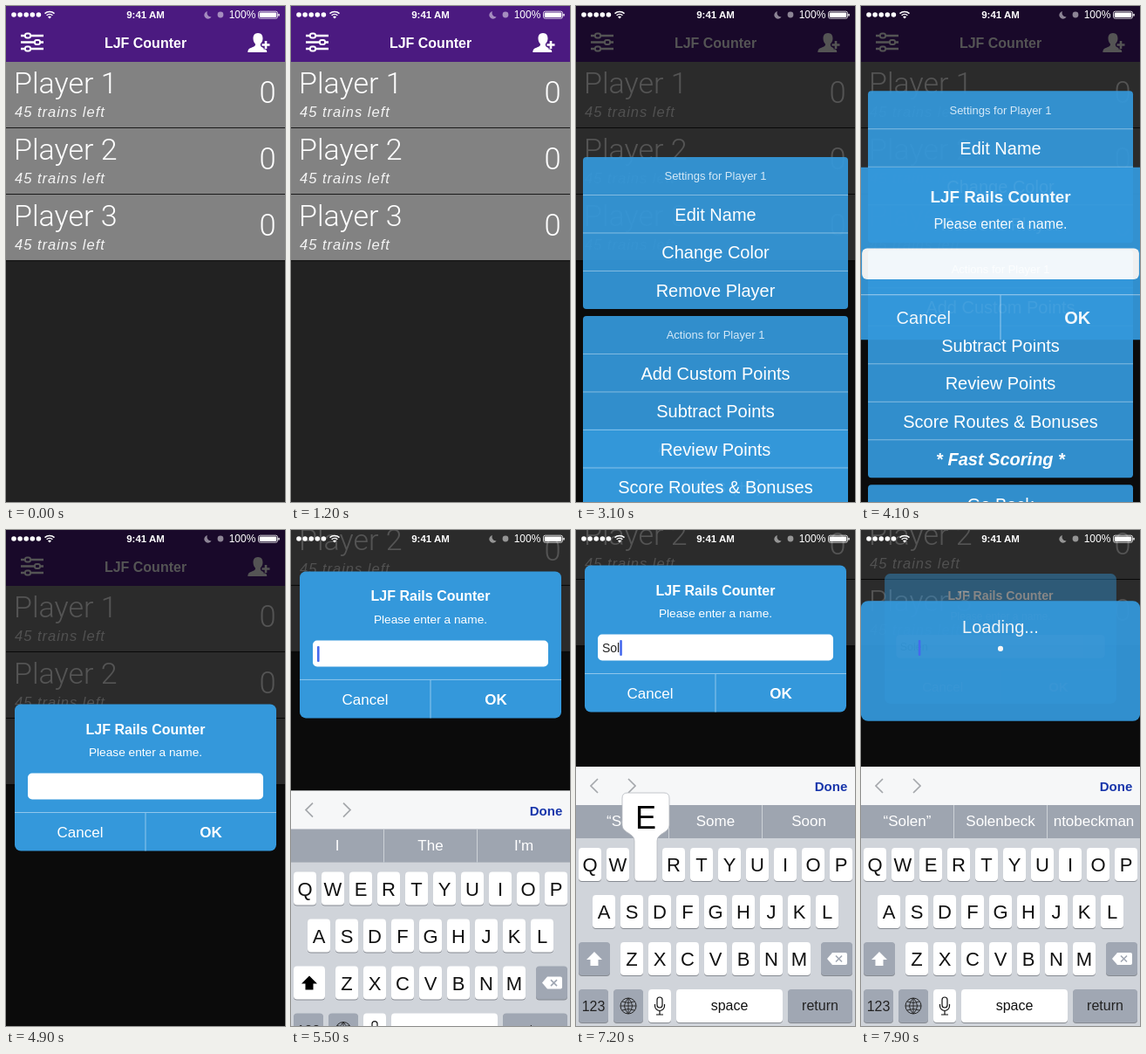
Recreate the animation shown at these times as an HTML page. Size 320x568 px, loop 8 s.

```html
<!DOCTYPE html>
<html lang="en">
<head>
<meta charset="utf-8">
<title>Score tracker demo</title>
<style>
  html, body { margin: 0; width: 100%; height: 100%; overflow: hidden; background: #222; }
  svg { display: block; width: 320px; height: 568px; }
  text { font-family: "Liberation Sans", Arial, sans-serif; white-space: pre; }
  .mid { text-anchor: middle; }
  .thin { font-family: Roboto, "Liberation Sans", sans-serif; font-weight: 300; }
  .bold { font-weight: 700; }
  .ital { font-style: italic; }
</style>
</head>
<body>
<svg id="stage" viewBox="0 0 320 568"></svg>
<script>
const LOOP = 8000;
const BLUE = '#3498db';
const ROW = 43.5;
const SHIFT = 159;
const SLIDE = 400;
const NAME = 'Solen';

// Markup helpers
const text = (x, y, size, str, cls = 'mid', fill = '#fff', more = '') =>
  `<text x="${x}" y="${y}" font-size="${size}" class="${cls}" fill="${fill}" ${more}>${str}</text>`;
const rect = (x, y, w, h, fill, r = 0, more = '') =>
  `<rect x="${x}" y="${y}" width="${w}" height="${h}" rx="${r}" fill="${fill}" ${more}/>`;
const circle = (x, y, r, fill, more = '') =>
  `<circle cx="${x}" cy="${y}" r="${r}" fill="${fill}" ${more}/>`;
const path = (d, fill, more = '') => `<path d="${d}" fill="${fill}" ${more}/>`;
const stroke = (color, w) => `stroke="${color}" stroke-width="${w}"`;
const group = (id, body) => `<g id="${id}">${body}</g>`;

function statusBar() {
  const dots = [0, 1, 2, 3, 4].map(i => circle(9 + i * 7.1, 10, 2.8, '#fff')).join('');
  const wifi = path('M44.5 8.6a8 8 0 0 1 11 0M46.6 10.8a5 5 0 0 1 6.8 0', 'none', stroke('#fff', 1.5)) +
    path('M50 14.5l-2-2.1a3 3 0 0 1 4 0z', '#fff');
  const dimIcons = `<g opacity=".5">` +
    path('M231 6a4.4 4.4 0 1 0 4.6 6.5a4.6 4.6 0 0 1-4.6-6.5z', '#fff') +
    circle(246, 10, 3.4, '#fff') + '</g>';
  const battery = rect(289.5, 6.2, 22, 8, 'none', 2, stroke('#fff', .8)) +
    rect(290.7, 7.4, 19.6, 5.6, '#fff', 1) + rect(312.3, 8.8, 1.4, 3, '#fff', .7);
  return dots + wifi + dimIcons + battery +
    text(160, 14, 11.5, '9:41 AM', 'mid bold') + text(271, 14, 12, '100%');
}

function navBar() {
  const sliders = [[34, 25], [41.5, 36], [49, 25]].map(([y, x]) =>
    path(`M17 ${y}H43`, 'none', stroke('#fff', 2.5)) +
    rect(x - 3, y - 2.5, 6, 5, '#4b1a80', 2, stroke('#fff', 1.9))).join('');
  const person = path('M289 31c-4 0-5.5 2.8-5.5 6.3c0 3 1.3 5 2.5 6.2c0 2.5-1 2.8-4 4c-3 1.1-4.5 2-4.7 5.5h22' +
    'c0-3-1.5-4-4.5-5.3c-2.3-1-3-1.5-3-4.2c1.3-1.3 2.7-3.2 2.7-6.2c0-3.5-1.5-6.3-5.5-6.3z', '#fff') +
    path('M298 39.5v10M293 44.5h10', 'none', stroke('#4b1a80', 5)) +
    path('M298 40v9M293.5 44.5h9', 'none', stroke('#fff', 2.6));
  return rect(0, 0, 320, 64, '#4b1a80') + sliders + person +
    text(160, 48, 16, 'LJF Counter', 'mid bold');
}

function playerRow(n) {
  const y = 64 + 76 * (n - 1);
  return rect(0, y, 320, 75, '#828282', 0, n === 1 ? 'id="firstRow"' : '') +
    rect(0, y + 75, 320, 1.6, '#1a1a1a') +
    text(9, y + 35.5, 34, 'Player ' + n, 'thin') +
    text(10, y + 62.5, 16.5, '45 trains left', 'ital', '#f4f4f4', 'letter-spacing="1"') +
    text(300, y + 47, 34.5, '0', 'mid thin');
}

// Panels are lists of rows; a row starting with "#" is a caption.
function sheet(panels) {
  let y = 0;
  return panels.map(rows => {
    const top = y;
    const h = rows.length * ROW;
    y += h + 8;
    return rect(8, top, 304, h, BLUE, 4, 'opacity=".93"') + rows.map((label, i) => {
      const cy = top + (i + .5) * ROW;
      const line = i ? rect(8, top + i * ROW - .5, 304, 1, '#fff', 0, 'opacity=".4"') : '';
      const hit = /^(More|Edit)/.test(label)
        ? rect(8, top + i * ROW, 304, ROW, '#1c6ea8', 4, `id="${label.slice(0, 4)}" opacity="0"`) : '';
      if (label[0] === '#') return text(160, cy + 4.8, 13, label.slice(1), 'mid', '#d5e9f7') + line;
      return hit + line + text(160, cy + 7.5, 20, label, label[0] === '*' ? 'mid bold ital' : 'mid');
    }).join('');
  }).join('');
}

// Alert and loader are drawn around their own centre.
function alertBox() {
  return rect(-150, -84, 300, 168, BLUE, 7) +
    text(0, -50, 16, 'LJF Rails Counter', 'mid bold') +
    text(0, -24.5, 13.7, 'Please enter a name.') +
    rect(-135, -5, 270, 30, '#fff', 5) +
    text(-130, 15, 14, '', '', '#222', 'id="typed"') +
    path('M-150 40H150M0 40V84', 'none', stroke('#8fc6ec', 1)) +
    text(-75, 68.5, 17, 'Cancel') + rect(.5, 40.5, 149, 43, '#1c6ea8', 5, 'id="okHit" opacity="0"') +
    text(75, 68.5, 17, 'OK', 'mid bold');
}
function loader() {
  return rect(-136, -58.5, 272, 117, BLUE, 7) + text(0, -27, 17, 'Loading...') + circle(0, -12, 2.6, '#fff');
}

const keyAt = {};
const key = (x, y, w, fill) => rect(x, y + 1, w, 38, '#868a91', 4) + rect(x, y, w, 38, fill, 4);
function keyboard() {
  const grey = '#a0a7b3';
  const letters = [['QWERTYUIOP', 3, 364], ['ASDFGHJKL', 19, 418], ['ZXCVBNM', 51, 472]]
    .map(([row, x0, y]) => [...row].map((ch, i) => {
      const x = x0 + 32 * i;
      keyAt[ch] = { x: x + 13, y };
      return key(x, y, 26, '#fff') + text(x + 13, y + 27, 22, ch, 'mid', '#111');
    }).join('')).join('');
  const shift = rect(3, 473, 36, 38, '#868a91', 4) + rect(3, 472, 36, 38, '#fff', 4, 'id="shiftKey"') +
    path('M21 483l9 9h-4.5v7h-9v-7H12z', '#000', 'id="shiftArrow"');
  const back = key(281, 472, 36, grey) +
    path('M288 491l6-7h15a2 2 0 0 1 2 2v10a2 2 0 0 1-2 2h-15z', '#fff') +
    path('M298 487.5l7 7m0-7l-7 7', 'none', stroke(grey, 1.6));
  const globe = key(43, 526, 34, grey) + circle(60, 545, 9, 'none', stroke('#222', 1)) +
    path('M51 545h18M60 536v18M53 540q7 3 14 0M53 550q7-3 14 0M60 536q-9 9 0 18M60 536q9 9 0 18', 'none', stroke('#222', .9));
  const mic = key(83, 526, 26, '#fff') + rect(93, 535, 6, 12, 'none', 3, stroke('#111', 1.2)) +
    path('M90.5 543v2a5.5 5.5 0 0 0 11 0v-2M96 550.5v4M92 555h8', 'none', stroke('#111', 1.2));
  return rect(0, 271, 320, 300, '#d0d4da') + rect(0, 271, 320, 44, '#f6f7f8') +
    path('M25 285l-8 8 8 8M60 285l8 8-8 8', 'none', stroke('#a5a8ac', 1.7)) +
    text(292.5, 299, 15, 'Done', 'mid bold', '#1836ab') +
    rect(0, 315, 320, 38, '#9ea5b0') + rect(106, 315, 1, 38, '#cdd2d8') + rect(213, 315, 1, 38, '#cdd2d8') +
    [53, 160, 267].map((x, i) => text(x, 339, 17, '', 'mid', '#fff', `id="hint${i}"`)).join('') +
    letters + shift + back + globe + mic +
    key(3, 526, 34, grey) + text(20, 551, 16, '123', 'mid', '#222') +
    key(115, 526, 122, '#fff') + text(176, 550, 16, 'space', 'mid', '#111') +
    key(243, 526, 74, grey) + text(280, 550, 16, 'return', 'mid', '#222') +
    group('popup',
      path('M-21-63h42q6 0 6 6v31c0 9-14 9-14 18v42q0 4-4 4h-18q-4 0-4-4v-42c0-9-14-9-14-18v-31q0-6 6-6z',
        '#fff', stroke('#b4b8be', .8)) + text(0, -22, 36, '', 'mid', '#000', 'id="popupChar"'));
}

document.getElementById('stage').innerHTML =
  rect(0, 0, 320, 568, '#222') +
  group('page', navBar() + [1, 2, 3].map(playerRow).join('')) +
  rect(0, 0, 320, 568, '#000', 0, 'id="dim"') +
  group('pointsSheet', sheet([
    ['#Add points for Player 1', ...[1, 2, 4, 7, 10, 15].map((p, i) => `${i + 1} trains (+${p})`)],
    ['More Options...'], ['Cancel']])) +
  group('optionSheet', sheet([
    ['#Settings for Player 1', 'Edit Name', 'Change Color', 'Remove Player'],
    ['#Actions for Player 1', 'Add Custom Points', 'Subtract Points', 'Review Points',
      'Score Routes &amp; Bonuses', '* Fast Scoring *'],
    ['Go Back']])) +
  group('alert', alertBox()) + group('loader', loader()) +
  rect(0, 0, 2.6, 18, '#4569ee', 1, 'id="caret"') +
  group('keyboard', keyboard()) + statusBar();

const $ = id => document.getElementById(id);
const set = (id, attrs) => Object.entries(attrs).forEach(([k, v]) => $(id).setAttribute(k, v));
const show = (id, on) => set(id, { display: on ? 'inline' : 'none' });
const move = (id, x, y, scale = 1) => set(id, { transform: `translate(${x} ${y}) scale(${scale})` });
const put = (id, str) => { if ($(id).textContent !== str) $(id).textContent = str; };
const within = (t, a, b) => t >= a && t < b;
const ramp = (t, start, length) => Math.min(1, Math.max(0, (t - start) / length));

// cubic-bezier(.36, .66, .04, 1)
function ease(x) {
  let lo = 0, hi = 1;
  for (let i = 0; i < 22; i++) {
    const s = (lo + hi) / 2, q = 1 - s;
    if (3 * q * q * s * .36 + 3 * q * s * s * .04 + s * s * s < x) lo = s; else hi = s;
  }
  const q = 1 - lo;
  return 3 * q * q * lo * .66 + 3 * q * lo * lo + lo ** 3;
}
const glide = (t, start, length = SLIDE) => ease(ramp(t, start, length));

function slideSheet(id, t, top, inAt, outAt) {
  const hidden = 568 - top;
  show(id, within(t, inAt, outAt + SLIDE));
  move(id, 0, top + hidden * (1 - glide(t, inAt) + glide(t, outAt)));
}

function popIn(id, t, start, x, y, outAt = Infinity) {
  const p = ramp(t, start, 270);
  const out = ramp(t, outAt, 107);
  show(id, t >= start && out < 1);
  move(id, x, y, 1.2 - .2 * p - .2 * out);
  set(id, { opacity: Math.min(1, .1 + p * 7.3) * (1 - out) });
}

const presses = [6220, 6580, 6820, 7040, 7260];
const HOLD = 170;

function typing(t) {
  const count = presses.filter(p => t >= p + HOLD).length;
  const typed = NAME.slice(0, count);
  put('typed', typed);
  const hints = count === 0 ? ['I', 'The', "I'm"]
    : count < NAME.length ? [`“${typed}”`, 'Some', 'Soon']
    : [`“${typed}”`, 'Solenbeck', 'ntobeckman'];
  hints.forEach((h, i) => put('hint' + i, h));
  set('shiftKey', { fill: count ? '#a0a7b3' : '#fff' });
  set('shiftArrow', { fill: count ? '#fff' : '#000' });

  const active = presses.findIndex(p => within(t, p, p + HOLD));
  show('popup', active >= 0);
  if (active >= 0) {
    const ch = NAME[active].toUpperCase();
    put('popupChar', ch);
    move('popup', keyAt[ch].x, keyAt[ch].y);
  }
  return count ? $('typed').getComputedTextLength() : 0;
}

function draw(t) {
  const shift = -SHIFT * glide(t, 5220, 510);
  move('page', 0, shift);
  set('firstRow', { fill: within(t, 1400, 1600) ? '#6c6c6c' : '#828282' });
  set('dim', { opacity: .67 * ramp(t, 1500, 240) });

  slideSheet('pointsSheet', t, 153, 1499, 2979);
  slideSheet('optionSheet', t, 66, 2982, 4088);
  set('More', { opacity: within(t, 2700, 2950) ? .6 : 0 });
  set('Edit', { opacity: within(t, 3800, 4000) ? .6 : 0 });

  popIn('alert', t, 4070, 160, 283.5 + shift, 7840);
  popIn('loader', t, 7870, 160, 150);
  set('okHit', { opacity: within(t, 7560, 7760) ? .6 : 0 });

  show('keyboard', t >= 5220);
  move('keyboard', 0, 297 * (1 - glide(t, 5220, 660)));
  const width = typing(t);
  show('caret', t >= 5300);
  move('caret', 30 + width, 285 + shift);
}

function tick(now) {
  draw(now % LOOP);
  requestAnimationFrame(tick);
}
draw(0);
requestAnimationFrame(tick);
</script>
</body>
</html>
```
